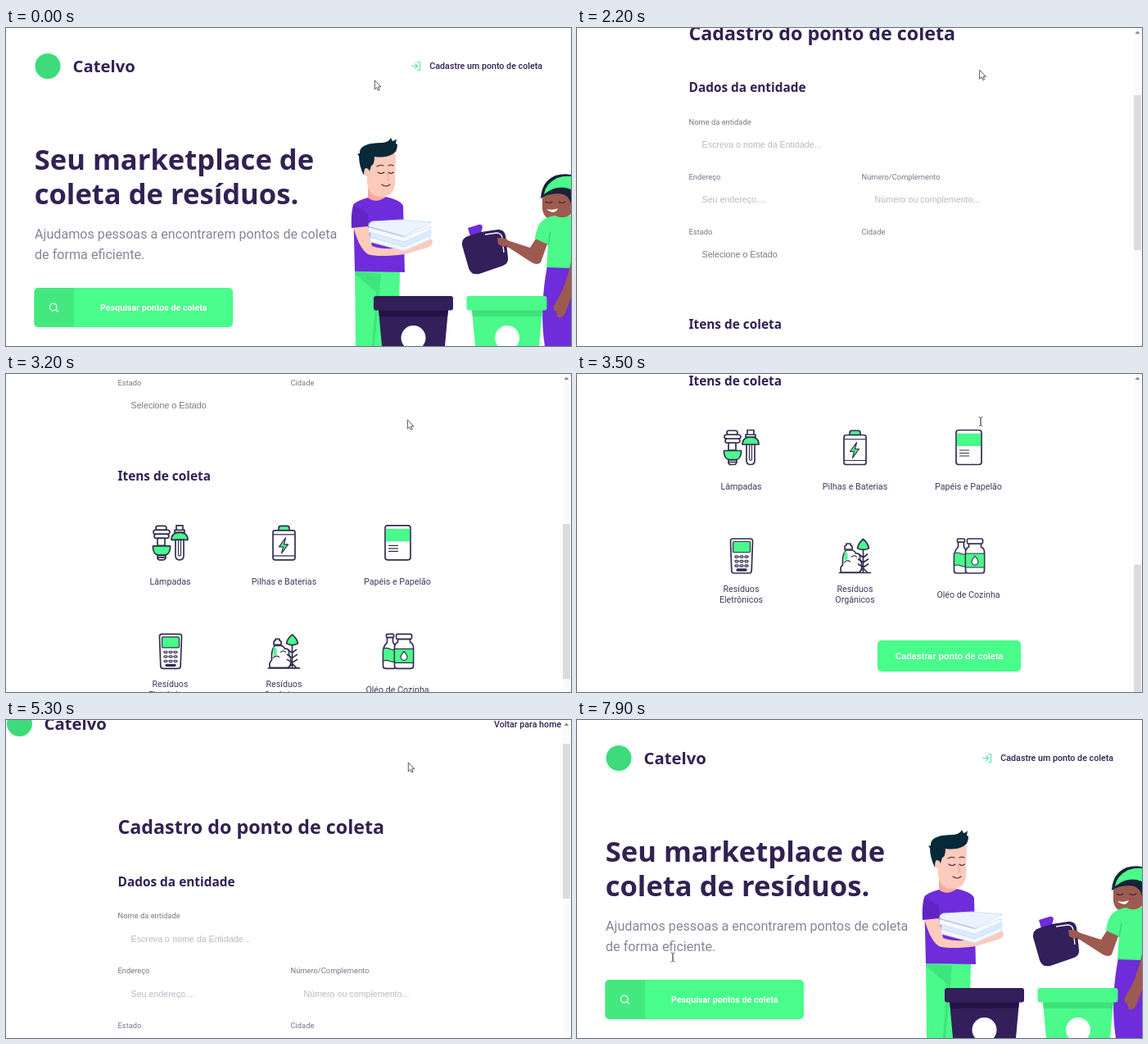
An HTML page for the animation above (8000 ms loop, 690 by 388 pixels).

```html
<!DOCTYPE html>
<html lang="pt">
<head>
<meta charset="utf-8">
<title>Catelvo</title>
<style>
html, body { margin: 0; width: 100%; height: 100%; overflow: hidden; background: #fff; }
svg { display: block; width: 100%; height: 100%; }
.title { font: 700 15.4px "Noto Sans", sans-serif; fill: #322153; }
.brand { font-size: 20.3px; }
.hero { font-size: 34.6px; }
.head { font-size: 23.25px; }
.body { font: 400 10.7px Roboto, sans-serif; fill: #3d3a5c; }
.lead { font-size: 16.15px; fill: #85859a; }
.link { font-weight: 500; fill: #322153; }
.label { font-size: 9.35px; fill: #77778a; }
.field { font: 400 10.7px "Liberation Sans", Arial, sans-serif; fill: #b9b9c8; }
.btn { font-weight: 700; fill: #fff; }
.mid { text-anchor: middle; }
.icon { fill: #fff; stroke: #322f50; stroke-width: 1.7; stroke-linejoin: round; stroke-linecap: round; }
.icon .g { fill: #4af98b; }
.icon .n { fill: none; }
.icon .t { fill: none; stroke-width: 1.2; }
.skin { fill: #fdcabb; }
.brown { fill: #9d5a50; }
.violet { fill: #6e2cdb; }
.green { fill: #4bfa8b; }
.dark { fill: #331f5a; }
.line { fill: none; stroke: #3a2535; stroke-width: 1.1; stroke-linecap: round; }
</style>
</head>
<body>
<svg viewBox="0 0 690 388" preserveAspectRatio="none">
  <rect width="690" height="388" fill="#fff"/>

  <g id="home">
    <circle cx="51" cy="46.500" r="15.500" fill="#3ddb7c"/>
    <text class="title brand" x="81.500" y="54">Catelvo</text>
    <path d="M502 41.500h3.500v10H502M495 46.500h7M499.500 43.500l3 3-3 3" fill="none" stroke="#62e3a0" stroke-width="1.200"/>
    <text class="body link" x="517.300" y="50">Cadastre um ponto de coleta</text>
    <text class="title hero" x="34.700" y="173">Seu marketplace de</text>
    <text class="title hero" x="34.700" y="214.500">coleta de resíduos.</text>
    <text class="body lead" x="35" y="256.700">Ajudamos pessoas a encontrarem pontos de coleta</text>
    <text class="body lead" x="35" y="282.200">de forma eficiente.</text>
    <rect x="34.500" y="317" width="242.500" height="48" rx="5" fill="#48fd89"/>
    <path d="M83 317H39.500a5 5 0 0 0-5 5v38a5 5 0 0 0 5 5H83z" fill="#43e97e"/>
    <g fill="none" stroke="#fff" stroke-width="1.300">
      <circle cx="57.700" cy="340.500" r="4.300"/><path d="M61 343.800l2.700 2.700"/>
    </g>
    <text class="body btn" x="115" y="344.700">Pesquisar pontos de coleta</text>

    <!-- man -->
    <path class="green" d="M426 295h55l-2 93h-52z"/>
    <path d="M458 300l-8 88h-3l5-66-26-22v-3z" fill="#40e47c"/>
    <path d="M442 186v24q10 8 21 0v-12z" fill="#f4ab9f"/>
    <path class="skin" d="M441 152v37q2 17 17 17 16 0 17-17l1-35-18-8z"/>
    <path class="skin" d="M441 169q-6-1-5 6 1 7 7 6z"/>
    <path d="M437 180q-6-12-6-24l-2-2 3-1q-1-9 14-12 8-1 14-1 8-1 10-6l2 4q3 0 5-3l-1 6 2 1q0 9-6 12-9 5-22 3 0 10-4 11l-2 7q-1-4-5-4-2 1-2 9z" fill="#08293a"/>
    <path class="line" d="M454 176q4 3 8 0M467 176q3 3 6 0M453 169q4-3 8-1M467 168q3-2 6 0M459 191q5 4 10 0"/>
    <path d="M465 177l3 8-3 1" fill="none" stroke="#ea9f94"/>
    <path class="violet" d="M424 216q3-5 18-9 10 8 22-1 18 4 21 11l2 81-61-1z"/>
    <path class="skin" d="M424 242l18-1 5 25q16 6 44 1l19-8q9-4 11 1 0 6-7 8l-27 8q-32 4-45 0-11-7-18-34z"/>
    <path d="M424 216q-3 11-2 28l20-2v-16z" fill="#6225c4"/>
    <g stroke="#cfe1f5" stroke-width=".9">
      <path d="M445 261l41 11 32-14v-5l-32 14-41-12z" fill="#f3f8ff"/>
      <path d="M445 255l41 12 33-15v-5l-33 14-41-12z" fill="#dcebfd"/>
      <path d="M443 249l43 12 32-14v-5l-32 13-43-12z" fill="#f6faff"/>
      <path d="M443 242l43 12 34-17-37-3-36 2q-5 2-4 6z" fill="#eaf3ff"/>
    </g>

    <!-- woman -->
    <path d="M664 226h19v14h-21z" fill="#7f4644"/>
    <path class="brown" d="M655 202q7-10 35-8v33q-8 7-20 7-13 0-15-13z"/>
    <path d="M653 208q1-21 18-28 10-3 19-1v36q-3-13-16-13-13 0-21 6z" fill="#16233a"/>
    <path class="green" d="M657 203q2-13 16-20 9-3 17-2v16q-17-7-33 6z"/>
    <path class="line" d="M659 212q4 3 8 0M675 212q4 3 8 0"/>
    <path d="M660 221q8 2 14-1-4 9-14 1z" fill="#fff"/>
    <path class="violet" d="M661 290h29v98h-32q-7-44 3-98z"/>
    <path class="brown" d="M649 254l13 7-9 25q-4 4-11 0l-28-18-12-4q-2-6 4-8l9 4 25 8z"/>
    <path class="green" d="M654 236q9-7 17-7 10 5 19-1v65l-30-1 2-28-16-7q2-15 8-21z"/>
    <path d="M662 265l3-17" fill="none" stroke="#3ed676" stroke-width="1.500"/>
    <path class="brown" d="M690 285q-4 20-12 38l-9 16q-2 5 3 7l2 7q5 2 9-5l7-19z"/>

    <!-- jug -->
    <path class="violet" d="M564 244l13-4q4-1 5 3l-2 7-13 4z"/>
    <path class="dark" d="M557 265q-1-8 7-11l16-5 20-3q8-1 10 7l3 27q1 7-6 10l-29 10q-10 2-13-7z"/>
    <path d="M585 252l14-2q6 0 7 6l2 18" fill="none" stroke="#f5f3fb" stroke-width="1.400"/>
    <path class="brown" d="M600 256l11 1 5 6-8 4-7-3z"/>

    <!-- bins -->
    <path class="dark" d="M455 344h85l-4 44h-77z"/>
    <path d="M455 344h85l-1 8h-83z" fill="#241245"/>
    <rect class="dark" x="449" y="327" width="97" height="17.500" rx="3"/>
    <path class="green" d="M569 344h86l-4 44h-78z"/>
    <path d="M569 344h86l-1 8h-84z" fill="#3ee27a"/>
    <rect class="green" x="562.500" y="327" width="98" height="17.500" rx="3"/>
    <circle cx="497.500" cy="378" r="15" fill="#fff"/>
    <circle cx="612" cy="378" r="15" fill="#fff"/>
  </g>

  <g id="form">
    <g id="page">
      <circle cx="16.500" cy="46.500" r="15.500" fill="#3ddb7c"/>
      <text class="title brand" x="46.500" y="54">Catelvo</text>
      <text class="body link" x="596" y="50.500">Voltar para home</text>
      <text class="title head" x="136.500" y="181">Cadastro do ponto de coleta</text>
      <text class="title" x="136.500" y="244.500">Dados da entidade</text>
      <text class="body label" x="136.500" y="284">Nome da entidade</text>
      <text class="field" x="152.500" y="312.500">Escreva o nome da Entidade...</text>
      <text class="body label" x="136.500" y="351">Endereço</text>
      <text class="field" x="152.500" y="379.500">Seu endereço....</text>
      <text class="body label" x="347.500" y="351">Número/Complemento</text>
      <text class="field" x="363.500" y="379.500">Número ou complemento...</text>
      <text class="body label" x="136.500" y="418">Estado</text>
      <text class="body label" x="347.500" y="418">Cidade</text>
      <text class="field" x="152.500" y="446" style="fill:#77778a">Selecione o Estado</text>
      <text class="title" x="136.500" y="533.500">Itens de coleta</text>

      <!-- icons are drawn around their own centres -->
      <g class="icon" transform="translate(201 609.500)">
        <rect x="-18" y="-20.500" width="13" height="5" rx="2.500"/>
        <rect x="-21" y="-15.500" width="20" height="5" rx="2.500"/>
        <rect x="-20" y="-10.500" width="18" height="5" rx="2.500"/>
        <path d="M-16-5.500v9h9v-9z"/>
        <path class="g" d="M-21.500 4h21v3q-1 7-6 8h-9q-5-1-6-8z"/>
        <path d="M-16 15.500h10v3q-1 2.500-3 2.500h-4q-3 0-3-2.500zM-16 18h10"/>
        <path d="M7-15.500v-5.500h8v5.500zM5-12.500h12v-3H5z"/>
        <path class="g" d="M1-3.500q0-9 10-9t10 9z"/>
        <path d="M6-3.500h10V16q0 5-5 5t-5-5z"/><path class="t" d="M9.500-3v18q1.500 2 3 0V-3"/>
      </g>
      <g class="icon" transform="translate(339.500 609.500)">
        <path class="g" d="M-6.500-15v-3q0-2.500 3-2.500h7q3 0 3 2.500v3z"/>
        <rect x="-13.500" y="-15" width="27" height="36" rx="2.500"/>
        <path class="t" d="M-13-10h26M-13 16h26"/>
        <path class="g" stroke-width="1.200" d="M2-6l-8 11h5l-2 8 8-11h-5z"/>
      </g>
      <g class="icon" transform="translate(478.500 609.500)">
        <rect x="-15.500" y="-21" width="31" height="42" rx="3"/>
        <rect class="g" x="-14.600" y="-17" width="29.200" height="15.500" stroke="none"/>
        <path class="t" d="M-11 3.500h11M-11 7h11M-11 10.500h11"/>
      </g>
      <g class="icon" transform="translate(201 742)">
        <path d="M-11-21h22q2.500 0 2.500 3l-1.300 36q-.2 3-3 3H-9.200q-2.800 0-3-3l-1.300-36q0-3 2.500-3z"/>
        <rect class="g" x="-10.500" y="-17.500" width="21" height="13" rx="1" stroke-width="1.200"/>
        <path class="n" stroke-width="3.400" d="M-7 1h2M-1 1h2M5 1h2M-7 6.500h2M-1 6.500h2M5 6.500h2M-7 12h2M-1 12h2M5 12h2M-5 17h10"/>
        <path class="n" stroke="#fff" stroke-width=".9" d="M-7 1h2M-1 1h2M5 1h2M-7 6.500h2M-1 6.500h2M5 6.500h2M-7 12h2M-1 12h2M5 12h2"/>
      </g>
      <g class="icon" transform="translate(339.500 742)">
        <path class="n" d="M-19 20.500h38"/>
        <path d="M-12.500-8v-3q0-2 2-2v-2h5v2q2 0 2 2v3z"/>
        <path d="M-17 20q-2-6 2-9v-8q1-7 4-10h8q3 1 4 4 6-1 5 7 5 8 0 16z"/>
        <path class="g" d="M-13-6v12l4-2v-7z" stroke="none"/>
        <path class="t" d="M-13 8q3-4 7-1M-4 1q3-3 6 0"/>
        <path class="g" d="M10-20.500q6 5 7 11-7 4-14 0 1-6 7-11z"/>
        <path class="n" d="M10-8v28M5-2l5 4 5-4M4 4l6 4 6-4M4 10l6 4 6-4M5 20l5-5 5 5"/>
      </g>
      <g class="icon" transform="translate(478.500 742)">
        <path d="M-13-17h7v6q4 5 4 12v17q0 3-3 3h-10q-3 0-3-3V1q0-7 5-12z"/>
        <path class="g" stroke-width="1.200" d="M-18-3q4-2 8 0t8 0V12q-4 2-8 0t-8 0z"/>
        <rect x="-14" y="-21" width="9" height="4" rx="1"/>
        <path d="M0-15h15v4q4 2 4 6v23q0 3-3 3H-1q-3 0-3-3V-5q0-4 4-6z"/>
        <path class="g" stroke-width="1.200" d="M-4-3h23v17H-4z"/>
        <rect x="-2" y="-21" width="19" height="6" rx="1.500"/>
        <path stroke-width="1.200" d="M7.500 0q4 5 4 7a4 4 0 0 1-8 0q0-2 4-7z"/>
      </g>

      <g class="body mid">
        <text x="200.500" y="660.500">Lâmpadas</text>
        <text x="339.500" y="660.500">Pilhas e Baterias</text>
        <text x="478" y="660.500">Papéis e Papelão</text>
        <text x="200.500" y="786">Resíduos</text>
        <text x="200.500" y="799">Eletrônicos</text>
        <text x="339.500" y="786">Resíduos</text>
        <text x="339.500" y="799">Orgânicos</text>
        <text x="478" y="792.500">Oléo de Cozinha</text>
      </g>
      <rect x="367" y="845" width="175" height="38" rx="5" fill="#48fd89"/>
      <text class="field btn mid" x="454.500" y="867.500" style="font-weight:700;fill:#fff">Cadastrar ponto de coleta</text>
    </g>
    <rect x="680" width="9" height="388" fill="#fbfbfb"/>
    <path d="M681.500 7l3-3.500 3 3.500z" fill="#8a8a8a"/>
    <rect id="thumb" x="680" y="11" width="9" height="189" fill="#dcdcdc"/>
  </g>

  <g id="cursor" stroke="#444" stroke-width=".9" fill="#fff" stroke-linejoin="round">
    <path id="arrow" d="M.3.800v11l2.500-2.300 1.600 3.600 1.800-.8-1.600-3.500h3.300z"/>
    <path id="hand" d="M-1.300 1.300a1.300 1.300 0 0 1 2.600 0V6l5 1.200q1.700.5 1.500 2.300L7 12.500 6 16H-1.200l-3.600-5.500q-.8-1.700.7-1.800l2.800 2z"/>
    <path id="beam" fill="none" stroke="#555" d="M-2.500-5.500q2.500 0 2.500 1.500v8q0 1.500-2.500 1.500M2.500-5.500Q0-5.500 0-4v8q0 1.500 2.500 1.500"/>
  </g>
</svg>
<script>
const LOOP = 8000, STEP = 100;
const $ = id => document.getElementById(id);

// [time, value...]
const scroll = [[1600, 0], [1700, 14], [2100, 133], [2500, 267], [2600, 296], [2700, 322], [2800, 333],
  [3000, 333], [3100, 357], [3400, 497], [3500, 520], [3600, 524],
  [4100, 524], [4200, 505], [4600, 382], [4800, 324], [4900, 324], [5000, 284], [5300, 42], [5400, 0]];
const pointer = [[0, 450, 63], [100, 450, 63], [800, 504, 46], [1600, 504, 46], [2500, 487, 52],
  [3000, 487, 52], [3400, 493, 58], [4100, 493, 58], [4400, 491, 51], [5500, 491, 51],
  [6300, 114.5, 51], [7000, 114.5, 51], [7900, 117, 289.5]];
const shapes = [[0, "arrow"], [700, "hand"], [1700, "arrow"], [3300, "beam"], [4200, "arrow"],
  [4500, "hand"], [4800, "arrow"], [6200, "hand"], [7200, "arrow"], [7500, "beam"]];

function at(keys, t) {
  const i = keys.findIndex(k => k[0] > t);
  if (i < 0) return keys[keys.length - 1].slice(1);
  if (i === 0) return keys[0].slice(1);
  const a = keys[i - 1], b = keys[i], p = (t - a[0]) / (b[0] - a[0]);
  // long moves ease in and out, short ones stay linear
  const e = b[0] - a[0] > 600 ? p * p * (3 - 2 * p) : p;
  return a.slice(1).map((v, j) => v + (b[j + 1] - v) * e);
}

const show = (id, on) => $(id).setAttribute("display", on ? "inline" : "none");

function draw(ms) {
  const t = Math.floor((ms % LOOP) / STEP) * STEP;
  const onForm = t >= 1200 && t < 7100;
  show("home", !onForm);
  show("form", onForm);

  const [y] = at(scroll, t);
  $("page").setAttribute("transform", `translate(0 ${-y})`);
  $("thumb").setAttribute("y", 11 + y * 0.426);

  $("cursor").setAttribute("transform", `translate(${at(pointer, t)})`);
  const shape = shapes.filter(s => s[0] <= t).pop()[1];
  for (const id of ["arrow", "hand", "beam"]) show(id, id === shape);
}

let start;
function tick(now) {
  start ??= now;
  draw(now - start);
  requestAnimationFrame(tick);
}
draw(0);
requestAnimationFrame(tick);
</script>
</body>
</html>
```
